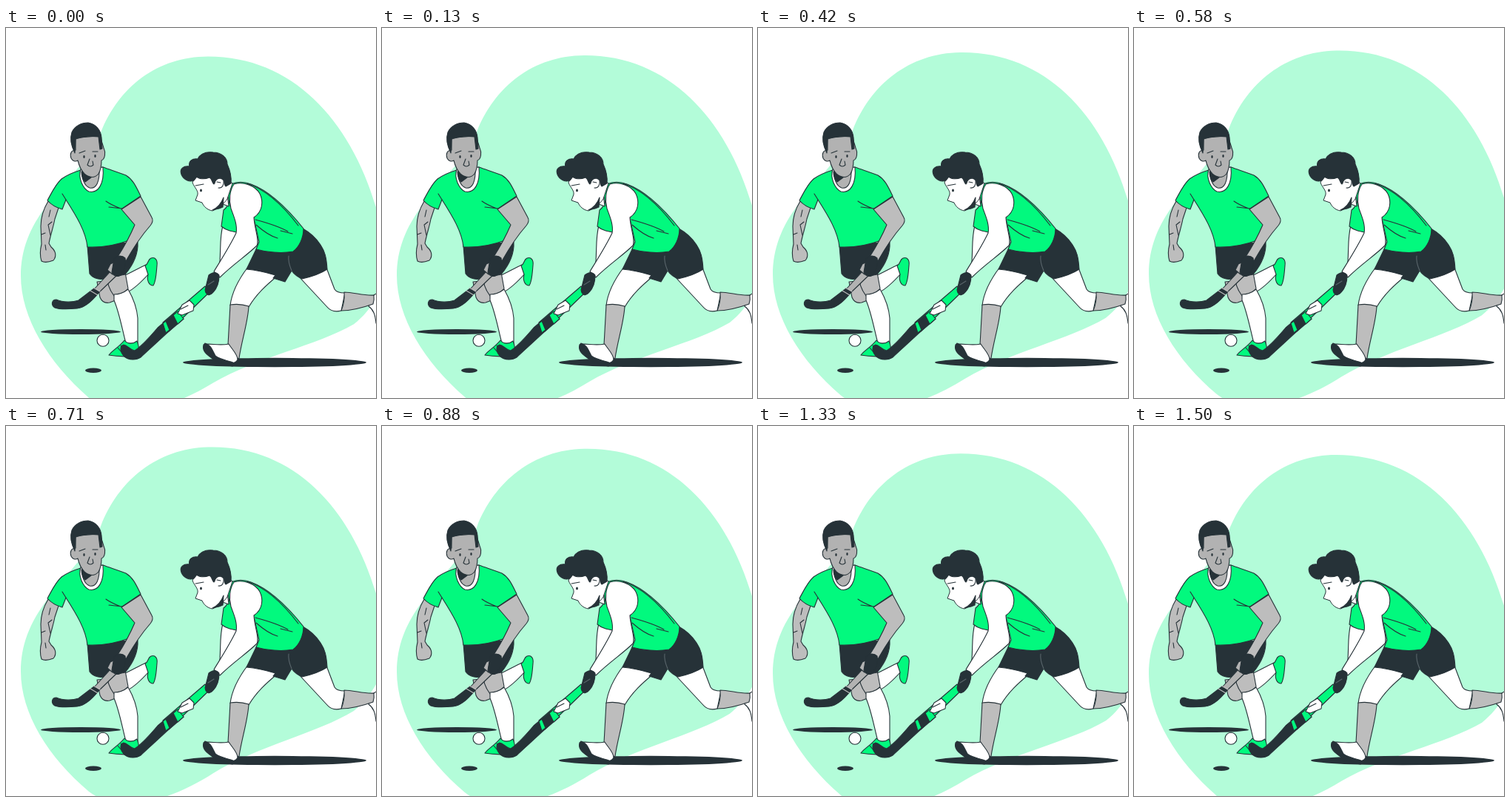
These frames come from a looping animation (500x500 px, 1540 ms). An HTML page:

```html
<!DOCTYPE html>
<html lang="en">
<head>
<meta charset="utf-8">
<title>Field hockey</title>
<style>
html, body { margin: 0; width: 100%; height: 100%; overflow: hidden; background: #fff; }
svg { display: block; width: 100vw; height: 100vh; }
.line { stroke: #263238; stroke-width: 1.1; stroke-linejoin: round; stroke-linecap: round; }
.dark { fill: #263238; }
.green { fill: #02f97e; }
.grey { fill: #bdbdbd; }
.skin { fill: #b2b2b2; }
.white { fill: #fff; }
.none { fill: none; }
</style>
</head>
<body>
<svg viewBox="0 0 500 500">
  <path id="blob" fill="#b3fcd9" d="M20 335C20 300 32 270 55 240C95 190 118 170 128 142C152 80 205 39 273 39C386 39 465 124 500 243C525 310 515 365 470 401C420 430 340 445 280 480C215 520 150 530 112 500C57 452 20 392 20 335Z"/>

  <g class="dark">
    <ellipse cx="101" cy="410.5" rx="54" ry="3.4"/>
    <ellipse cx="118" cy="462.7" rx="11" ry="3.2"/>
    <ellipse cx="363" cy="452" rx="124" ry="6.2"/>
  </g>

  <g id="defender" class="line">
    <path class="white" d="M159 335C170 330 180 324 189 320L193 332C184 342 174 352 164 357L153 358Z"/>
    <path class="green" d="M188 321C193 319 191 313 196 311C202 309 205 314 204 321C203 331 203 342 199 348C193 348 190 341 192 333Z"/>
    <path class="grey" d="M123 343L127 364Q131 373 140 371L148 368L146 341Z"/>
    <path class="grey" d="M137 334C136 344 140 354 146 362C153 362 160 358 165 352L161 330Z"/>
    <path class="white" d="M146 360C153 360 160 357 165 353C173 367 177 380 178 392L178 426L162 426C157 407 153 384 146 368Z"/>
    <path class="green" d="M139 442C143 436 153 431 160 422C165 428 172 427 177 423C180 430 180 437 179 442C171 445 150 444 139 442Z"/>
    <path class="none" d="M155 429L160 436M151 432L156 438"/>
    <path class="dark" d="M110 294L113 332C118 339 128 341 137 338L161 333C171 321 179 305 178 289Z"/>
    <path class="grey" d="M57 234C51 244 47 255 47 268L48 292C46 300 46 309 48 315C53 318 59 316 64 314C69 308 67 301 61 296L58 291C60 280 64 269 66 258L71 243Z"/>
    <path class="none" d="M60 246L58 255M62 262L57 266L60 280M48 279L53 277M53 293L54 300"/>
    <path class="green" d="M101 192C91 195 82 199 75 204C67 211 62 222 56 233C62 240 69 243 76 245L81 232C95 254 108 275 110 296C130 297 150 293 166 287L175 266L157 244L182 227C176 215 172 205 162 199C152 195 142 192 131 188Z"/>
    <path class="none" d="M155 244C150 242 142 239 135 234M157 244L139 242M81 232L76 224"/>
    <path class="white" d="M101 191C97 203 104 217 112 221C125 224 133 210 131 188Z"/>
    <path class="skin" d="M103 190C101 204 107 214 113 216C122 218 127 208 126 188Z"/>
    <path class="dark" d="M102 194L115 202L107 208Q102 203 102 194Z"/>
    <path class="grey" d="M182 228L197 256Q200 261 195 267C180 284 171 299 162 315L151 309C160 295 168 280 174 266L156 245Z"/>
    <path class="skin" d="M94 165C88 165 86 170 88 176C90 180 94 181 97 179C99 187 102 193 106 197C113 203 120 203 125 197C128 192 129 186 129 179C134 177 135 168 132 162L127 146L94 148Z"/>
    <path class="dark" d="M93 169C88 159 86 150 89 141C93 132 102 128 111 128C122 130 128 138 129 148L130 163L127 164L125 147Q110 145 94 150Z"/>
    <path class="none" d="M99 169L107 166M117 167L124 167M113 177L110 185Q114 189 118 185L117 180"/>
    <ellipse class="dark" cx="105.5" cy="174" rx="1.2" ry="2" stroke="none"/>
    <ellipse class="dark" cx="120.5" cy="173" rx="1.2" ry="2" stroke="none"/>
    <path class="skin" d="M142 328L119 353L125 358L151 333Z"/>
    <path class="dark" d="M119 352L126 357C118 367 108 378 96 379C85 380 74 381 66 378C60 374 62 367 68 367C77 371 90 371 98 368Z"/>
    <path d="M114 355L124 361M118 351L127 356" stroke="#bdbdbd"/>
    <path class="skin" d="M137 327L141 319L147 316L151 326L144 333Z"/>
    <path class="dark" d="M146 312C150 307 157 307 161 311C163 319 160 327 155 334C150 337 145 335 143 330Z"/>
  </g>

  <circle class="line white" cx="131" cy="422.3" r="8"/>

  <g id="attacker" class="line">
    <path class="white" d="M505 356L497 361L490 376C497 381 499 388 500 399L508 399Z"/>
    <path class="white" d="M394 334L434 377C439 383 445 384 453 382L458 358Q447 358 444 353L433 324Z"/>
    <path class="grey" d="M457 357C470 357 483 362 497 361Q498 367 496 373C482 378 467 382 453 382Q458 370 457 357Z"/>
    <path class="white" d="M327 323C314 340 305 358 303 375L328 377C338 360 351 348 368 334Z"/>
    <path class="grey" d="M303 374Q316 372 328 376C327 397 319 420 315 446L309 448L300 428Z"/>
    <path class="white" d="M267 428C274 425 286 430 301 427C306 435 313 441 313 448C310 455 298 454 288 449C279 443 271 437 267 428Z"/>
    <path class="dark" d="M269 426C277 428 279 436 283 443C290 449 301 449 309 453Q310 456 306 457C294 456 282 450 274 443C267 438 264 431 269 426Z"/>
    <path class="dark" d="M339 297L325 326C338 327 351 330 364 334L361 338L377 343L386 328Q391 335 400 339C413 336 425 332 434 326C433 310 431 302 425 293C419 284 412 277 401 271Z"/>
    <path d="M386 328C383 321 381 315 382 308" fill="none" stroke="#59656a"/>
    <path class="white" d="M293 267C288 286 291 302 288 326L313 300L315 270Z"/>
    <path class="green" d="M294 246L291 268C298 274 306 275 316 277L320 245L303 230Q300 242 294 246Z"/>
    <path class="green" d="M304 211C313 207 323 208 331 211C356 220 382 246 402 271C402 284 396 296 388 302C372 305 352 303 338 299L342 289L334 253L318 225L303 240C299 230 299 218 304 211Z"/>
    <path class="none" d="M337 259C352 263 367 267 381 275M338 266C347 274 356 281 367 284M371 274L387 278M326 210C350 218 373 238 395 267"/>
    <path class="white" d="M308 211C302 220 301 233 304 244C308 255 313 266 311 277C303 294 292 311 281 329L289 337C306 320 326 307 339 294C343 287 336 273 335 256C347 248 348 234 343 224C337 213 321 207 308 211Z"/>
    <path class="white" d="M294 212L306 210C300 219 299 231 301 241L293 238Z"/>
    <path class="white" d="M254 204L252 209C255 216 260 220 259 225L256 233L265 236C267 241 272 246 279 247C287 244 294 238 299 231L306 210L290 196L265 197Z" stroke-width="1"/>
    <path class="dark" d="M279 246C286 243 291 237 294 229L293 242L288 244Z"/>
    <path class="dark" d="M254 206C248 209 240 205 237 198C234 190 240 186 248 187C246 180 252 176 259 177C263 169 271 167 280 168C291 168 299 175 299 184C303 193 305 201 304 210L297 214C293 211 297 204 291 203C285 202 283 206 281 211C278 209 279 204 275 202C268 205 260 204 258 201Z"/>
    <path class="white" d="M282 210C283 203 291 201 294 206C295 212 292 217 287 216"/>
    <path class="none" d="M256 213L267 211M285 208L290 209"/>
    <ellipse class="dark" cx="263.5" cy="219.5" rx="1.4" ry="2.1" stroke="none"/>

    <path class="green" d="M269 349L212 398L220 410L276 356Z"/>
    <path class="dark" d="M229 385L205 405C194 418 184 429 174 436C167 435 165 429 159 428C153 430 154 438 160 444C166 449 176 449 182 445C195 433 210 419 220 410L240 393Z"/>
    <path class="green" d="M212 399L216 396L221 408L216 412ZM226 388L232 383L240 393L232 400Z"/>
    <path class="white" d="M238 374L248 368L254 374L253 382L243 386L238 388L232 386Z"/>
    <path class="none" d="M236 380L246 375"/>
    <path class="dark" d="M271 346L274 334C279 330 284 329 288 334C288 343 286 351 280 357C275 363 270 361 269 354Z"/>
    <path d="M273 347L281 342" fill="none" stroke="#59656a"/>
  </g>
</svg>
<script>
const LOOP = 1540;  // ms
const REST = 1490;  // moment the blob is lowest
const blob = document.getElementById("blob");

// The blob rises and settles, its right side swinging further than its left.
function draw(time) {
  const phase = ((time + LOOP - REST) % LOOP) / LOOP;
  const lift = Math.pow(1 - Math.abs(2 * phase - 1), 1.15);
  blob.setAttribute("transform", `matrix(1 ${-0.028 * lift} 0 1 0 ${-3 * lift})`);
}

const start = performance.now();
function tick(now) {
  draw(Math.max(0, now - start) % LOOP);
  requestAnimationFrame(tick);
}
draw(0);
requestAnimationFrame(tick);
</script>
</body>
</html>
```
